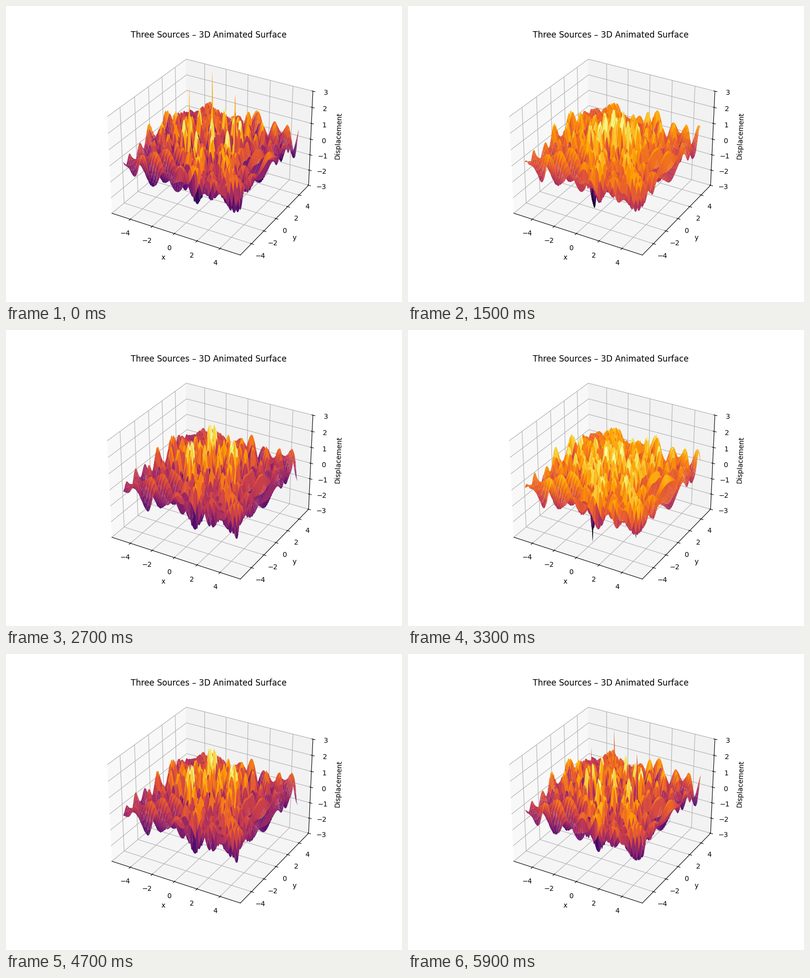
A matplotlib script for the animation above (6000 ms loop, 800 by 600 pixels).

```python
import numpy as np
import matplotlib.pyplot as plt
from matplotlib.animation import FuncAnimation

FRAMES = 60
PERIOD = 20          # frames per oscillation
INTERVAL = 100       # ms
K = 2 * np.pi        # wavenumber for a wavelength of 1
LIMIT = 5.5 + 11 / 48

axis = np.linspace(-5, 5, 150)
X, Y = np.meshgrid(axis, axis)

# Three sources on a circle of radius 2, 120 degrees apart
angles = np.arange(3) * 2 * np.pi / 3
distances = [np.hypot(X - 2 * np.cos(a), Y - 2 * np.sin(a)) for a in angles]


def displacement(step):
    phase = 2 * np.pi * step / PERIOD
    return sum(np.cos(K * r - phase) / np.sqrt(r) for r in distances)


fig = plt.figure(figsize=(8, 6), dpi=100)
ax = fig.add_subplot(projection="3d")

# One surface per phase; each keeps its own colour range
surfaces = [ax.plot_surface(X, Y, displacement(s), cmap="inferno")
            for s in range(PERIOD)]

ax.set_xlim(-LIMIT, LIMIT)
ax.set_ylim(-LIMIT, LIMIT)
ax.set_zlim(-3, 3)
ax.set_xlabel("x")
ax.set_ylabel("y")
ax.set_zlabel("Displacement")
ax.set_title("Three Sources – 3D Animated Surface")


def update(frame):
    for step, surface in enumerate(surfaces):
        surface.set_visible(step == frame % PERIOD)
    return surfaces


anim = FuncAnimation(fig, update, frames=FRAMES, interval=INTERVAL,
                     repeat=True, repeat_delay=0, blit=False)
plt.show()
```
